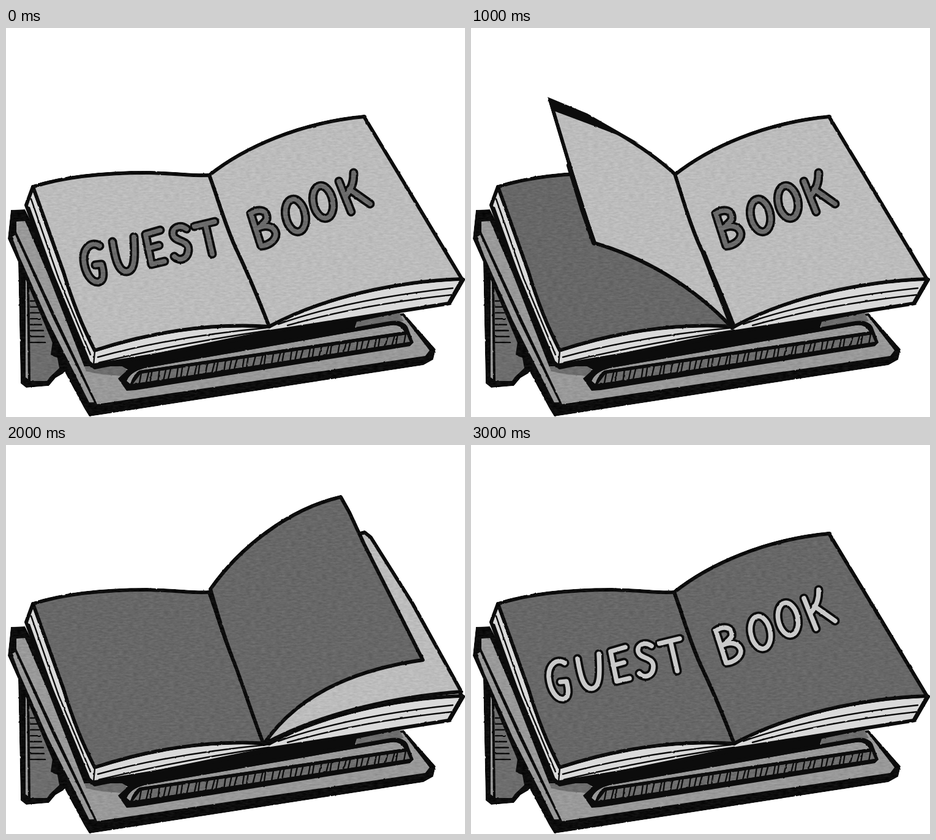
Recreate the animation shown at these times as an HTML page. Size 750 by 637 pixels, loop 3.5 s.

```html
<!DOCTYPE html>
<html lang="en">
<head>
<meta charset="utf-8">
<title>Guest book</title>
<style>
  html, body { margin: 0; width: 100%; height: 100%; overflow: hidden; background: #fff; }
  svg { display: block; width: 100%; height: 100%; }
  path, ellipse, use { stroke-linecap: round; stroke-linejoin: round; }
  .ink { fill: #0c0c0c; }
  .line { fill: none; stroke: #0c0c0c; stroke-width: 6; }
  .fine { fill: none; stroke: #0c0c0c; stroke-width: 2.4; }
  .light { fill: #bcbcbc; }
  .dark { fill: #676767; }
  .edge { fill: #dadada; stroke: #0c0c0c; stroke-width: 6; }
  .wood { fill: #999; }
  .shade { fill: #6d6d6d; }
  .rim { fill: none; stroke: #0c0c0c; stroke-width: 15; }
  .core { fill: none; stroke: #6b6b6b; stroke-width: 7.5; }
  .core.pale { stroke: #cacaca; }
  .page { stroke: #0c0c0c; stroke-width: 6; }

  /* Each pose holds for a seventh of the loop, starting at slot --i. */
  .pose { animation: one 3500ms step-end calc(var(--i) * 500ms - 3500ms) infinite; }
  .pose.two { animation-name: two; }
  @keyframes one { 0% { opacity: 1 } 14.2857%, 100% { opacity: 0 } }
  @keyframes two { 0% { opacity: 1 } 28.5714%, 100% { opacity: 0 } }
</style>
</head>
<body>
<svg viewBox="0 0 750 637" preserveAspectRatio="none" role="img" aria-label="Guest book">
  <defs>
    <filter id="grain" filterUnits="userSpaceOnUse" x="0" y="0" width="750" height="637" color-interpolation-filters="sRGB">
      <feTurbulence type="fractalNoise" baseFrequency=".12 .36" numOctaves="3" seed="4"/>
      <feColorMatrix values="1 0 0 0 0  1 0 0 0 0  1 0 0 0 0  0 0 0 0 1"/>
      <feComposite in="SourceGraphic" operator="arithmetic" k2="1" k3=".12" k4="-.06"/>
      <feComposite in2="SourceGraphic" operator="in"/>
    </filter>
    <filter id="rough" filterUnits="userSpaceOnUse" x="0" y="0" width="750" height="637" color-interpolation-filters="sRGB">
      <feTurbulence type="fractalNoise" baseFrequency=".12" numOctaves="2" seed="7"/>
      <feDisplacementMap in="SourceGraphic" scale="2" xChannelSelector="R" yChannelSelector="G"/>
    </filter>

    <path id="left" d="M44 260C100 242 170 237 230 237C280 238 310 243 332 241C345 275 360 330 378 366C395 402 415 450 430 489C330 482 230 500 145 528Q115 470 94 400Z"/>
    <path id="right" d="M332 241C390 195 480 155 585 145L658 266L745 411C640 415 520 440 430 489C415 450 395 402 378 366C360 330 345 275 332 241Z"/>

    <g id="guest">
      <path d="M153 357C140 348 126 360 127 380C129 402 140 417 151 416C162 413 159 398 156 387L146 388"/>
      <path d="M174 350C178 375 183 399 197 399C211 398 211 375 209 342"/>
      <path d="M252 331L228 338L238 387L259 382M232 361L250 356"/>
      <path d="M295 329C284 321 271 327 273 338C276 351 297 346 298 362C298 379 283 383 275 374"/>
      <path d="M308 325L341 317M326 322L337 370"/>
    </g>
    <g id="book">
      <path d="M400 304L417 357C429 356 441 348 441 337C439 325 425 321 411 328C416 324 423 319 426 313C428 300 415 294 400 304"/>
      <ellipse cx="473" cy="307" rx="16" ry="27" transform="rotate(-12 473 307)"/>
      <ellipse cx="518" cy="285" rx="16" ry="27" transform="rotate(-12 518 285)"/>
      <path d="M544 251L564 301M568 237Q569 258 556 274M561 264L595 288"/>
    </g>
    <g id="title"><use href="#guest"/><use href="#book"/></g>
  </defs>

  <g filter="url(#rough)">
    <!-- stand -->
    <g filter="url(#grain)">
      <path class="ink" d="M20 383L24 582L33 589L70 586L81 573L98 563L110 540L60 400Z"/>
      <path class="shade" d="M38 412L62 470L76 514L73 535L84 540L87 557L72 571L67 578L40 578Z"/>
      <path class="wood" d="M32 412L34 412L36 575L32 572Z"/>
      <path class="fine" id="rungs"/>
      <path class="ink" d="M8 298L31 297L150 540L560 474L650 467L702 526L698 543L682 552L150 634L136 636L128 623L96 563L22 388L3 345Z"/>
      <path class="wood" d="M10 342L15 339L78 478L144 613L136 613L68 478L22 374Z"/>
      <path class="wood" d="M17 317L31 316L68 402L128 555L190 558L560 484L648 471L692 528L685 537L149 616L84 478L17 334Z"/>
      <path class="shade" d="M128 554L195 554L198 571L180 569Q155 568 131 562Z"/>
      <path class="shade" d="M570 474L643 467L650 480L572 492Z"/>
    </g>
    <path class="ink" d="M138 553L430 496L724 450L640 467L573 481L570 491L232 553L205 563L188 553Z"/>
    <path class="ink" d="M183 574L203 556L236 549L628 480Q648 477 656 489L666 515L660 521L212 593L197 594Z"/>
    <g filter="url(#grain)">
      <path class="wood" d="M197 578Q203 563 226 557L628 487Q644 484 651 497L218 561Q209 566 203 583Z"/>
      <path class="shade" d="M207 583L220 566L655 502L660 514Z"/>
    </g>
    <path class="fine" id="hatch"/>

    <!-- page block -->
    <path class="edge" d="M44 260L33 290L72 395L135 547L145 556L434 497L724 451L747 412L430 300Z"/>
    <path class="fine" d="M41 280L86 410L138 535M38 294L86 428L134 540M145 530L143 552"/>
    <path class="fine" d="M150 539Q270 506 425 491M152 548Q280 517 430 495"/>
    <path class="fine" d="M445 485Q560 444 730 426M460 487Q580 453 728 437"/>
    <path class="line" d="M140 553L300 526L434 499"/>
    <path class="line" style="stroke-width:7" d="M746 412L725 449"/>

    <!-- lying pages -->
    <g filter="url(#grain)">
      <use href="#left" class="page dark"/>
      <use href="#right" class="page light"/>
      <use href="#book" class="rim"/>
      <use href="#book" class="core"/>
    </g>
    <g class="pose" style="--i:0">
      <g filter="url(#grain)">
        <use href="#left" class="page light"/>
        <use href="#guest" class="rim"/>
        <use href="#guest" class="core"/>
      </g>
    </g>
    <g class="pose two" style="--i:5">
      <use href="#right" class="page dark" filter="url(#grain)"/>
    </g>
    <g class="pose" style="--i:6">
      <use href="#title" class="rim"/>
      <use href="#title" class="core pale"/>
    </g>

    <!-- turning page -->
    <g class="pose" style="--i:1">
      <path class="page light" filter="url(#grain)" d="M86 188C180 175 265 192 333 240C345 275 360 330 378 366C395 402 415 450 426 490C370 447 270 423 171 427L104 245Z"/>
      <path class="ink" d="M81 186L150 181L97 192L110 255L102 248Z"/>
      <path class="line" d="M230 192Q290 211 333 240"/>
    </g>
    <g class="pose" style="--i:2">
      <path class="page light" filter="url(#grain)" d="M129 118C200 147 280 190 333 239C345 275 360 330 378 366C395 402 415 450 426 490C360 420 280 375 201 352L165 238Z"/>
      <path class="ink" d="M125 113L190 140L275 189L200 160L136 136Z"/>
      <path class="line" d="M160 225L183 300L201 352M380 368L427 490" style="stroke-width:8"/>
    </g>
    <g class="pose" style="--i:3">
      <path class="page dark" filter="url(#grain)" d="M400 32C380 75 349 130 332 241C345 275 360 330 378 366C395 402 415 450 431 488C460 395 510 328 547 280Q527 230 487 165L440 96Z"/>
      <path class="ink" d="M397 30L401 26L446 100L488 162L548 275L540 272L480 172L438 108Z"/>
    </g>
    <g class="pose" style="--i:4">
      <g filter="url(#grain)">
        <path class="page light" d="M560 150L586 143L596 151L664 259L744 404C640 412 520 437 425 488Z"/>
        <path class="page dark" d="M334 236C380 170 460 105 547 85L561 110L585 162L681 352C598 364 486 394 421 490C405 450 390 402 375 362C358 320 345 275 334 236Z"/>
      </g>
    </g>
  </g>
</svg>
<script>
  const strokes = (id, n, make) =>
    document.getElementById(id).setAttribute("d", Array.from({ length: n }, (_, i) => make(i)).join(""));

  strokes("hatch", 45, i => {
    const x = 218 + i * 9.8 + 2 * Math.sin(i * 2.3);
    const y = 583 - (x - 207) * .153;
    return `M${x} ${y}l${3 + Math.sin(i * 1.7)} ${-16 + i * .07}`;
  });
  strokes("rungs", 8, i => `M40 ${447 + i * 9.7}h${10 + i * 2}`);
</script>
</body>
</html>
```
